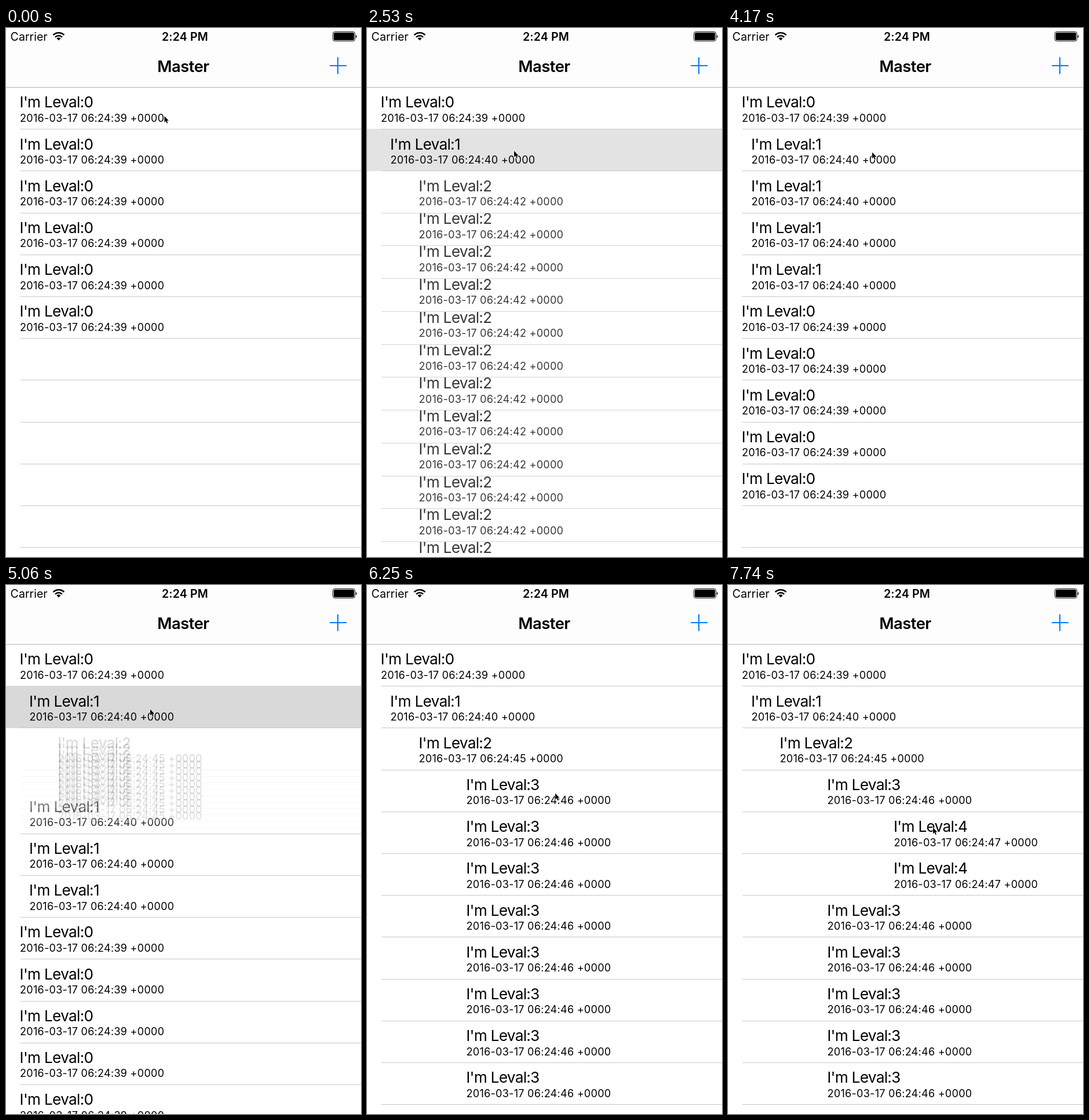
Write an HTML page that moves like this. It is 613 px wide and 913 px high and loops after 8 s.

```html
<!DOCTYPE html>
<html lang="en">
<head>
<meta charset="utf-8">
<title>Expanding list</title>
<style>
  html, body { margin: 0; width: 100%; height: 100%; overflow: hidden; background: #fff; }
  svg { display: block; width: 613px; height: 913px; font-family: Inter, Roboto, sans-serif; }
  .title { font-size: 26.2px; letter-spacing: -0.7px; }
  .date { font-size: 18px; letter-spacing: 0.28px; }
  .small { font-size: 19.6px; }
  .bold { font-weight: 600; }
  .clock { letter-spacing: 0.15px; }
  .head { font-size: 27.4px; letter-spacing: -0.5px; }
</style>
</head>
<body>
<svg viewBox="0 0 613 913">
  <rect width="613" height="913" fill="#fff"/>
  <g id="list"></g>
  <g id="bar">
    <rect width="613" height="102" fill="#fdfdfd"/>
    <rect y="102" width="613" height="1" fill="#b4b4b4"/>
    <text class="small" x="7.6" y="21.5">Carrier</text>
    <g fill="none" stroke="#000" stroke-width="2.6">
      <path d="M81.6 12.2a13.2 13.2 0 0 1 18.8 0"/>
      <path d="M85 15.8a8.4 8.4 0 0 1 12 0"/>
    </g>
    <path d="M87.5 18a5 5 0 0 1 7 0L91 21.6Z"/>
    <text class="small bold clock" x="309" y="21.5" text-anchor="middle">2:24 PM</text>
    <rect x="564.5" y="6.5" width="38" height="16" rx="3" fill="none" stroke="#000"/>
    <rect x="566" y="8" width="35" height="13" rx="1.6"/>
    <path d="M604 12a3 3 0 0 1 0 5.4Z"/>
    <text class="head bold" x="306" y="76.3" text-anchor="middle">Master</text>
    <path d="M559 65H588M573 50.5V79.5" stroke="#007aff" stroke-width="2"/>
  </g>
  <path id="cursor" d="M0 0.6V11.2L2.4 9L4.2 13L5.9 12.3L4.2 8.4H7.4Z" stroke="#fff" stroke-width="1.4" paint-order="stroke"/>
</svg>
<script>
const LOOP = 8000, TOP = 102, ROW = 72.2, SLIDE = 300;
const listEl = document.getElementById('list');
const cursorEl = document.getElementById('cursor');

// The screen refreshes only at these moments.
const ticks = [0, 600, 740, 890, 1640, 1790, 1940, 2390, 2530, 2680, 2980, 3130,
  3720, 3870, 4020, 4170, 5060, 5210, 5360, 5510, 5800, 5950, 6100, 6250,
  7150, 7300, 7450, 7590, 7740];

const taps = [
  { at: 526, row: 0, count: 4, level: 1, sec: 40 },
  { at: 2319.5, row: 1, count: 14, level: 2, sec: 42 },
  { at: 3710, row: 1, count: 14, close: true },
  { at: 4986, row: 1, count: 10, level: 2, sec: 45 },
  { at: 5726, row: 2, count: 14, level: 3, sec: 46 },
  { at: 7076, row: 3, count: 2, level: 4, sec: 47 }
];

// time, x, y
const path = [
  [0, 273.5, 151.5], [1500, 273.5, 151.5], [1940, 254, 211.5], [2850, 254, 211.5],
  [3130, 249, 214], [5210, 249, 214], [5510, 285, 288], [5950, 285, 288],
  [6250, 325, 359], [7300, 325, 359], [7740, 354, 418], [LOOP, 354, 418]
];

const clamp = v => Math.min(1, Math.max(0, v));
const ease = v => v * v * (3 - 2 * v);
const makeRows = (count, level, sec) => Array.from({ length: count }, () => ({ level, sec }));
const rule = y => `<rect x="25" y="${Math.round(y)}" width="588" height="1" fill="#c8c8c8"/>`;

function drawRow(row, y, alpha, shade, line) {
  const x = 25 + 16.4 * row.level ** 2;
  const top = Math.round(y);
  const height = Math.round(y + ROW) - top + (shade < 255 ? 1 : 0);
  return `<g opacity="${alpha}">` +
    `<rect y="${top}" width="613" height="${height}" fill="rgb(${shade},${shade},${shade})"/>` +
    (line ? rule(y + ROW) : '') +
    `<text class="title" x="${x - 1.4}" y="${y + 35.3}">I'm Leval:${row.level}</text>` +
    `<text class="date" x="${x - 1}" y="${y + 59.7}">2016-03-17 06:24:${row.sec} +0000</text></g>`;
}

function drawList(t) {
  const rows = makeRows(6, 0, 39);
  let tap = null, from = 0, count = 0, open = 1;
  for (const next of taps) {
    const age = t - next.at;
    if (age < 0) break;
    tap = next;
    from = tap.row + 1;
    count = tap.count;
    const p = ease(clamp(age / SLIDE));
    open = tap.close ? 1 - p : p;
    if (!tap.close) rows.splice(from, 0, ...makeRows(count, tap.level, tap.sec));
    else if (p === 1) {
      rows.splice(from, count);
      count = 0;
    }
  }

  const age = tap ? t - tap.at : Infinity;
  const glow = Math.round(217 + 38 * clamp((age - 119) / 345));
  const lit = tap ? tap.row : -1;
  const end = TOP + ROW * (rows.length - count * (1 - open));

  let out = '';
  for (let y = TOP + ROW; y < 913; y += ROW) if (y > end + 1) out += rule(y);

  // Upper rows lie over lower ones.
  for (let i = rows.length - 1; i >= 0; i--) {
    const kid = i >= from && i < from + count;
    const past = Math.min(count, Math.max(0, i - from));
    const y = TOP + ROW * (i - past * (1 - open));
    if (y > 913) continue;
    const hidden = (i === lit && age < 20) || (i === lit - 1 && age < 100);
    out += drawRow(rows[i], y, kid ? open : 1, i === lit ? glow : 255, !hidden);
  }
  listEl.innerHTML = out;
}

function drawCursor(t) {
  const i = path.findIndex(k => k[0] > t);
  const [t0, x0, y0] = path[i - 1], [t1, x1, y1] = path[i];
  const p = (t - t0) / (t1 - t0);
  cursorEl.setAttribute('transform', `translate(${x0 + (x1 - x0) * p} ${y0 + (y1 - y0) * p})`);
}

let shown = -1;
function update(now) {
  const t = now % LOOP;
  const tick = ticks.filter(v => v <= t).pop();
  if (tick !== shown) {
    shown = tick;
    drawList(tick);
    drawCursor(tick);
  }
}

function loop() {
  update(performance.now());
  requestAnimationFrame(loop);
}
loop();
</script>
</body>
</html>
```
